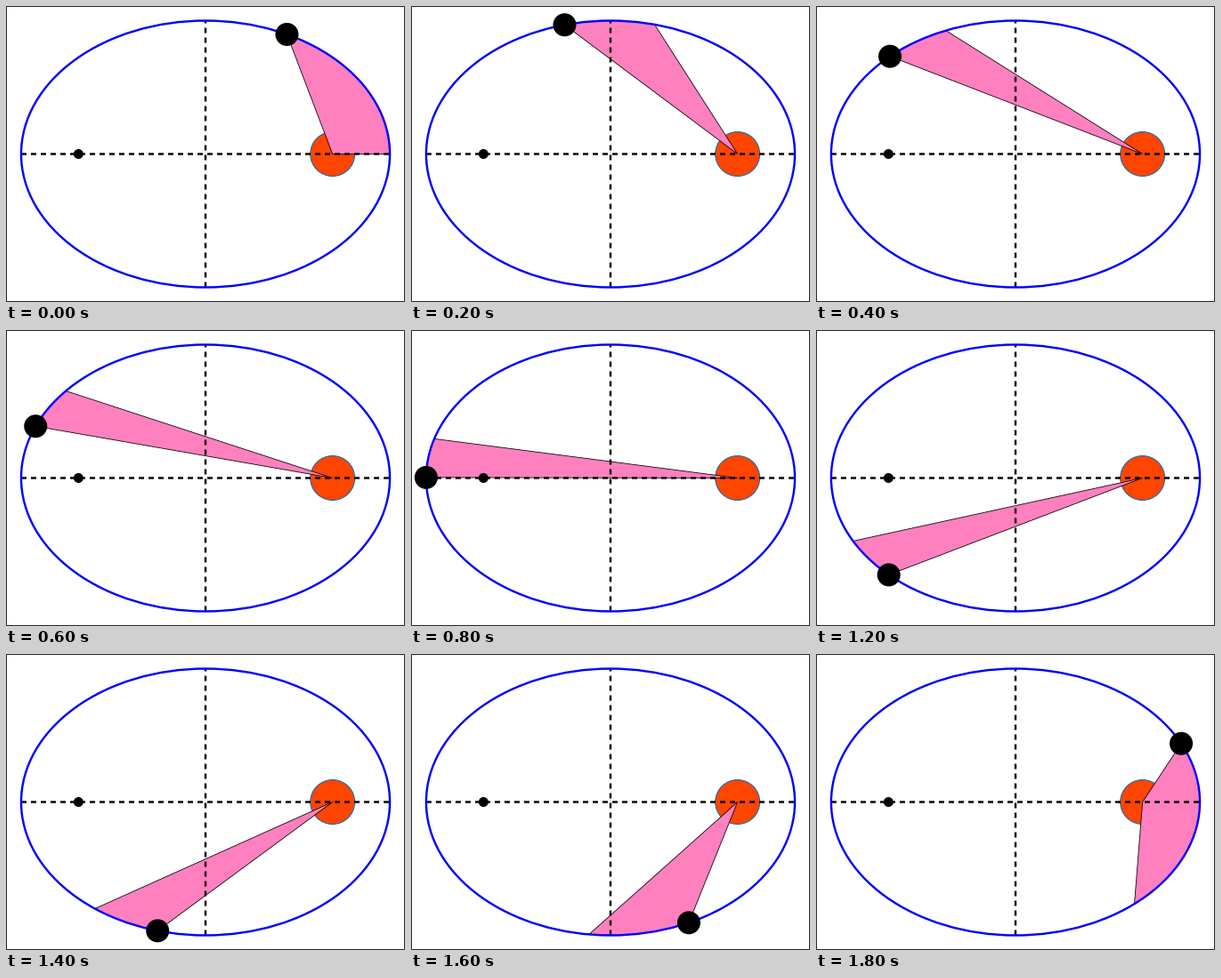
Write a matplotlib script that moves like this. It is 448 px wide and 333 px high and loops after 1900 ms.

```python
import numpy as np
import matplotlib.pyplot as plt
from matplotlib.animation import FuncAnimation
from matplotlib.patches import Circle, Ellipse, Polygon, Rectangle

W, H, DPI = 448, 333, 100
PX = 72 / DPI  # points per pixel
CX, CY = W / 2, H / 2
A, B = 207, 150
C = np.sqrt(A**2 - B**2)
ECC = C / A
FRAMES, INTERVAL = 19, 100
STEP = 0.33  # mean anomaly per frame
SWEEP = 1.5 * STEP  # mean anomaly covered by the sector
THIN, THICK = 0.8 * PX, 2.4 * PX
DASH, GAP = 6, 5  # pixels


def eccentric_anomaly(mean):
    """Solve Kepler's equation with Newton's method."""
    e = mean + ECC * np.sin(mean)
    for _ in range(12):
        e -= (e - ECC * np.sin(e) - mean) / (1 - ECC * np.cos(e))
    return e


def orbit(e):
    return np.column_stack([CX + A * np.cos(e), CY - B * np.sin(e)])


def dashed_line(xs, ys):
    pattern = (DASH * PX / THICK, GAP * PX / THICK)
    ax.plot(xs, ys, color="black", lw=THICK, ls=(0, pattern),
            dash_capstyle="butt", snap=False, zorder=3)


fig = plt.figure(figsize=(W / DPI, H / DPI), dpi=DPI, facecolor="white")
ax = fig.add_axes([0, 0, 1, 1])
ax.set_xlim(0, W)
ax.set_ylim(H, 0)
ax.axis("off")

sun = (CX + C, CY)
ax.add_patch(Rectangle((0.5, 0.5), W - 1, H - 1, fill=False, ec="#262626",
                       lw=PX, snap=False, zorder=0))
ax.add_patch(Circle(sun, 25, fc="orangered", ec="#0072bd", lw=PX, zorder=1))
sector = ax.add_patch(Polygon([sun, sun, sun], closed=True, fc="#ff80bf",
                              ec="black", lw=THIN, snap=False, zorder=2))
dashed_line([CX - A, CX + A], [CY, CY])
dashed_line([CX, CX], [CY + B, CY - B])
ax.add_patch(Ellipse((CX, CY), 2 * A, 2 * B, fill=False, ec="blue", lw=THICK,
                     zorder=4))
ax.add_patch(Circle((CX - C, CY), 5.5, fc="black", lw=0, zorder=5))
planet = ax.add_patch(Circle(sun, 13, fc="black", lw=0, zorder=6))


def update(i):
    start, end = (eccentric_anomaly(m) for m in (i * STEP, i * STEP + SWEEP))
    arc = orbit(np.linspace(start, end, 60))
    sector.set_xy(np.vstack([sun, arc]))
    planet.center = tuple(arc[-1])
    return sector, planet


anim = FuncAnimation(fig, update, frames=FRAMES, interval=INTERVAL,
                     init_func=lambda: update(0), repeat=True, repeat_delay=0)
plt.show()
```
